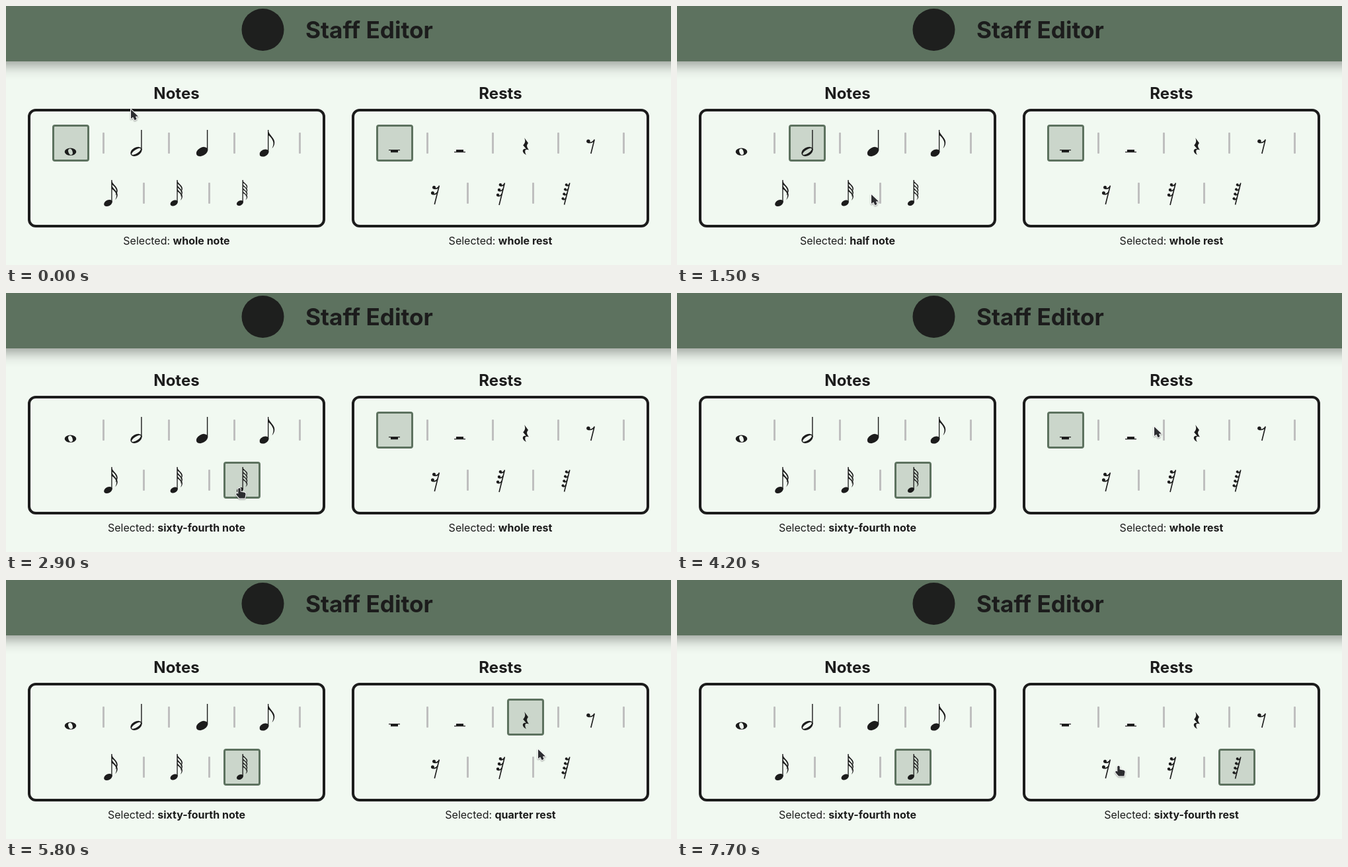
These frames come from a looping animation (1006 by 393 pixels, 8000 ms). An HTML page with a canvas:

```html
<!DOCTYPE html>
<html lang="en">
<head>
<meta charset="utf-8">
<title>Staff Editor</title>
<style>
  html, body { margin: 0; width: 100%; height: 100%; overflow: hidden; background: #f1f9f1; }
  #stage { position: relative; width: 1006px; height: 393px; overflow: hidden;
    font-family: Inter, sans-serif; font-optical-sizing: none; color: #1c1c1c; }
  canvas { position: absolute; left: 0; top: 0; }
  h1, h2, p { position: absolute; margin: 0; white-space: nowrap; }
  h1 { left: 453px; top: 15px; font-size: 35.2px; line-height: 42px; }
  h2, p { width: 450px; text-align: center; }
  h2 { top: 118px; font-size: 24px; line-height: 29px; }
  p { top: 346px; font-size: 16px; line-height: 20px; }
  .left { left: 33px; }
  .right { left: 523px; }
</style>
</head>
<body>
<div id="stage">
  <canvas id="view" width="1006" height="393"></canvas>
  <h1>Staff Editor</h1>
  <h2 class="left">Notes</h2>
  <h2 class="right">Rests</h2>
  <p class="left">Selected: <b id="note">whole note</b></p>
  <p class="right">Selected: <b id="rest">whole rest</b></p>
</div>
<script>
const ctx = document.getElementById('view').getContext('2d');
const W = 1006, H = 393, LOOP = 8000, STEP = 100, SLIDE = 400, SIZE = 56;
const INK = '#1c1c1c', GREEN = '#5d725f', PAPER = '#f1f9f1';
const NAMES = ['whole', 'half', 'quarter', 'eighth', 'sixteenth', 'thirty-second', 'sixty-fourth'];

// Pointer strokes; sag bends the way down (or up, if negative)
const START = { x: 189, y: 157 };
const MOVES = [
  { from: 0, to: 300, x: 210, y: 210, sag: 0 },
  { from: 990, to: 1900, x: 353, y: 296, sag: 26 },
  { from: 3300, to: 4200, x: 722, y: 203, sag: 0 },
  { from: 4300, to: 4500, x: 782, y: 217, sag: 0 },
  { from: 5580, to: 6120, x: 845, y: 289, sag: 15 },
  { from: 7100, to: 7700, x: 668, y: 282, sag: -20 }
];

// at: when the label changes; slide: when the highlight leaves, if later
const PANELS = [
  { x: 33, kind: 'note', picks: [{ at: 0, i: 0 }, { at: 740, i: 1 }, { at: 2300, slide: 2438, i: 6 }] },
  { x: 523, kind: 'rest', picks: [{ at: 0, i: 0 }, { at: 5040, i: 2 }, { at: 6540, i: 6 }] }
];

const lerp = (a, b, k) => a + (b - a) * k;
const clamp = k => Math.min(1, Math.max(0, k));
const smooth = k => k * k * (3 - 2 * k);

// cubic-bezier(.25, .1, .25, 1)
function ease(p) {
  if (p <= 0 || p >= 1) return clamp(p);
  let lo = 0, hi = 1, u = 0.5;
  for (let n = 0; n < 24; n++) {
    u = (lo + hi) / 2;
    if (0.75 * u * (1 - u) + u ** 3 < p) lo = u; else hi = u;
  }
  return 0.3 * u * (1 - u) ** 2 + 3 * u * u * (1 - u) + u ** 3;
}

function cell(panel, i) {
  return i < 4 ? { x: panel.x + 37 + 99 * i, y: 180 }
               : { x: panel.x + 98 + 99 * (i - 4), y: 256 };
}

function pointerAt(t) {
  let { x, y } = START;
  for (const m of MOVES) {
    const k = smooth(clamp((t - m.from) / (m.to - m.from)));
    x = lerp(x, m.x, k);
    y = lerp(y, m.y, k) + m.sag * Math.sin(Math.PI * k);
  }
  return { x: Math.round(x), y: Math.round(y) };
}

function oval(x, y, rx, ry, deg, color = INK) {
  ctx.beginPath();
  ctx.ellipse(x, y, rx, ry, deg * Math.PI / 180, 0, 2 * Math.PI);
  ctx.fillStyle = color;
  ctx.fill();
}

function bar(x, y, w, h, color = INK) {
  ctx.fillStyle = color;
  ctx.fillRect(x, y, w, h);
}

function box(x, y, w, h, r) {
  ctx.beginPath();
  ctx.roundRect(x, y, w, h, r);
}

function shape(d, x, y, sx = 1, sy = 1) {
  ctx.save();
  ctx.translate(x, y);
  ctx.scale(sx, sy);
  ctx.fillStyle = INK;
  ctx.fill(new Path2D(d));
  ctx.restore();
}

// Two ellipses filled even-odd, so what lies below shows through
function hollow(x, y, ...rings) {
  const p = new Path2D();
  for (const [rx, ry, deg] of rings) {
    const a = deg * Math.PI / 180;
    p.moveTo(x + rx * Math.cos(a), y + rx * Math.sin(a));
    p.ellipse(x, y, rx, ry, a, 0, 2 * Math.PI);
  }
  ctx.fillStyle = INK;
  ctx.fill(p, 'evenodd');
}

const FLAG = 'M0 0C.6 8 9.5 12 9.5 20C9.5 24 8 27 5.8 29.5C8 24 8.3 21 7 17.5C5.4 13.2 2.5 10 0 8.5Z';
const QUARTER_REST = 'M3.2 0L9 8C6 11.5 6.7 13.6 10 18.6C6.4 17 4 18 4.3 21C4.4 23 5 24.4 6 26' +
  'C.6 23.4-1 18.3 3.2 16.8C4.3 16.5 5 16.7 6 17L1.2 11.2C4.8 7.6 4.9 4.7 3.2 0Z';

// More flags make every part smaller
function flagged(stem, top, count) {
  const r = 8.1 - 0.7 * count, y = top + 35;
  oval(stem - 0.92 * r, y, r, r * 0.67, -28);
  bar(stem - 1.3, top, 1.3, y - top - 1);
  for (let n = 0; n < count; n++) {
    shape(FLAG, stem - 0.8, top + n * (8 - 0.7 * count), 1.12 - 0.09 * count, 1.1 - 0.15 * count);
  }
}

function hooked(x, top, height, count) {
  const stemAt = y => x - 0.25 * (y - top);
  const r = 3 - 0.25 * count, reach = 10 - 1.4 * count;
  ctx.strokeStyle = INK;
  ctx.lineWidth = 1.6;
  ctx.beginPath();
  ctx.moveTo(x, top);
  ctx.lineTo(stemAt(top + height), top + height);
  for (let n = 0; n < count; n++) {
    const y = top + 2.7 + n * (10 - 0.75 * count), dot = stemAt(y) - reach;
    oval(dot, y, r, r, 0);
    ctx.beginPath();
    if (!n) {
      ctx.moveTo(x, top);
      ctx.lineTo(stemAt(top + height), top + height);
    }
    ctx.moveTo(dot, y + r - 0.6);
    ctx.quadraticCurveTo(dot + reach * 0.65, y + r + 0.3, stemAt(y - r * 0.7), y - r * 0.7);
    ctx.stroke();
  }
}

function drawNotes() {
  const head = [9.4, 6.2, -30];
  hollow(97.5, 221.2, [8.8, 5.6, 0], [4.8, 3.1, 70]);
  hollow(197, 220.8, head, [8, 2.8, -33]);
  oval(296.5, 221, ...head);
  bar(204.2, 188, 1.4, 31);
  bar(303.9, 188, 1.4, 31);
  flagged(397.3, 188, 1);
  for (let n = 0; n < 3; n++) flagged(160.6 + 99.1 * n, 264, n + 2);
}

function drawRests() {
  bar(579, 218, 17, 1.2);
  bar(582, 218.5, 11, 3.7);
  bar(678, 221, 17, 1.2);
  bar(681, 218, 11, 3.7);
  shape(QUARTER_REST, 781, 200);
  hooked(890.2, 202.5, 21.5, 1);
  hooked(655.4, 272.5, 28.5, 2);
  hooked(754.4, 268.5, 33.5, 3);
  hooked(852.8, 268.5, 33, 4);
}

function drawHeader() {
  ctx.save();
  ctx.shadowColor = 'rgba(0,0,0,.42)';
  ctx.shadowBlur = 20;
  ctx.shadowOffsetY = 5;
  bar(-50, -50, W + 100, 134, GREEN);
  ctx.restore();
  oval(388.5, 36, 32, 32, 0, '#1e1f1e');
}

function drawPanel(panel, t) {
  ctx.strokeStyle = INK;
  ctx.lineWidth = 4;
  box(panel.x + 2, 158, 446, 176, 10);
  ctx.stroke();

  for (let i = 0; i < 6; i++) {
    const c = cell(panel, i);
    box(c.x + 76, c.y + 12, 3, 32, 1);
    ctx.fillStyle = '#bfbfbf';
    ctx.fill();
  }

  const n = panel.picks.findLastIndex(p => p.at <= t);
  const pick = panel.picks[n], last = panel.picks[Math.max(0, n - 1)];
  const a = cell(panel, last.i), b = cell(panel, pick.i);
  const k = ease((t - (pick.slide || pick.at)) / SLIDE);
  const x = Math.round(lerp(a.x, b.x, k)), y = Math.round(lerp(a.y, b.y, k));
  box(x + 1.5, y + 1.5, SIZE - 3, SIZE - 3, 2.5);
  ctx.fillStyle = '#cbd6cb';
  ctx.fill();
  ctx.strokeStyle = GREEN;
  ctx.lineWidth = 3;
  ctx.stroke();

  const label = document.getElementById(panel.kind);
  const name = NAMES[pick.i] + ' ' + panel.kind;
  if (label.textContent !== name) label.textContent = name;
}

const ARROW = new Path2D('M0 0V14L3.2 11.4L5.6 16.2L8.6 14.8L6.9 10.6H11Z');
const HAND = new Path2D('M-1.7 1Q0-.9 1.7 1V5.4L8 6.8Q9.8 7.4 9.5 9.6L8.4 15.5H0L-4.7 10Q-5 7.6-3 7.8L-1.7 9Z');

function drawPointer(t) {
  const { x, y } = pointerAt(t);
  const over = PANELS.some(p => NAMES.some((_, i) => {
    const c = cell(p, i);
    return x >= c.x && x < c.x + SIZE && y >= c.y && y < c.y + SIZE;
  }));
  const path = over ? HAND : ARROW;
  ctx.save();
  ctx.translate(x, y);
  ctx.lineJoin = 'round';
  ctx.lineWidth = 2;
  ctx.strokeStyle = '#fff';
  ctx.shadowColor = 'rgba(0,0,0,.4)';
  ctx.shadowBlur = 2;
  ctx.shadowOffsetY = 1;
  ctx.stroke(path);
  ctx.shadowColor = 'transparent';
  ctx.fillStyle = '#2c2d30';
  ctx.fill(path);
  ctx.restore();
}

function frame(now) {
  const t = Math.floor((now % LOOP) / STEP) * STEP;
  bar(0, 0, W, H, PAPER);
  drawHeader();
  PANELS.forEach(p => drawPanel(p, t));
  drawNotes();
  drawRests();
  drawPointer(t);
  requestAnimationFrame(frame);
}
requestAnimationFrame(frame);
</script>
</body>
</html>
```
